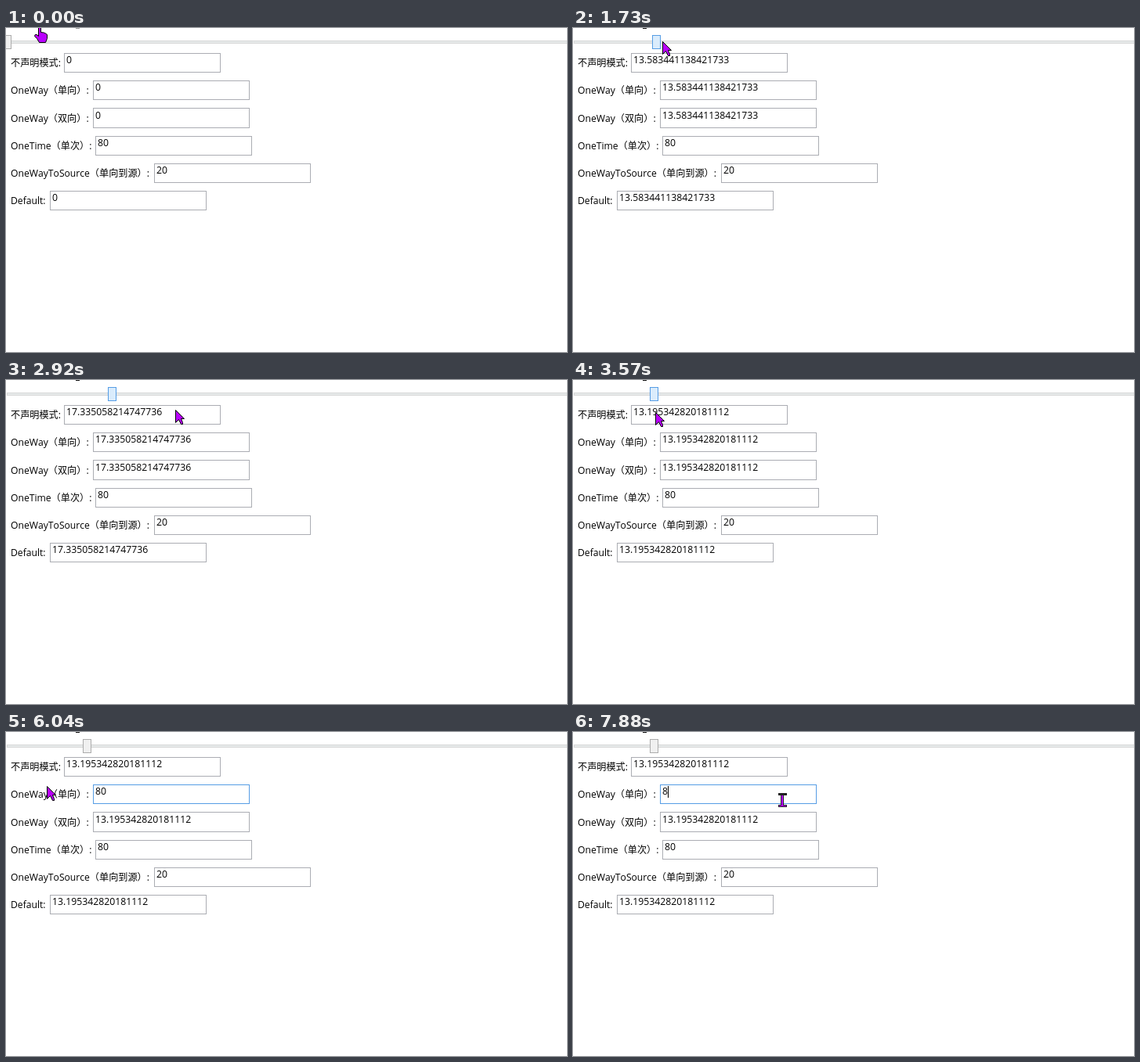
An HTML page with a canvas for the animation above (8 s loop, 716x414 px).

```html
<!DOCTYPE html>
<html lang="zh">
<head>
<meta charset="utf-8">
<style>
  html, body { margin: 0; width: 100%; height: 100%; overflow: hidden; background: #fff; }
  canvas { display: block; }
</style>
</head>
<body>
<canvas id="stage" width="716" height="414"></canvas>
<script>
const ctx = document.getElementById('stage').getContext('2d');
const LOOP = 8000, STEP = 91.8;
const FONT = '"Open Sans", "Noto Sans CJK SC", "Noto Sans CJK", sans-serif';
const PURPLE = '#b900ff', HOVER = '#7eb4ea', ACTIVE = '#569de5';
const DRAG_START = 12, DRAG_END = 39;

const ROW_PITCH = 35.2;
const rows = [
  ['不声明模式:', 74],
  ['OneWay（单向）:', 111],
  ['OneWay（双向）:', 111],
  ['OneTime（单次）:', 114],
  ['OneWayToSource（单向到源）:', 189],
  ['Default:', 56]
].map(([label, x], i) => {
  const top = 32 + ROW_PITCH * i;
  const y = Math.round(top);
  return {
    label, x, y,
    h: Math.round(top + 25.2) - y,
    textY: Math.round(top + 13.2),
    labelY: Math.round(top + 17.2)
  };
});

// pointer stops: step, x, y
const stops = [
  [0, 41, -2], [4, 52, 9], [9, 5, 16], [11, 5, 16], [18, 114, 17], [19, 114, 17],
  [30, 127, 28], [31, 143, 32], [32, 216, 38], [35, 345, 40], [38, 111, 41], [39, 105, 41],
  [46, 245, 80], [47, 245, 80], [51, 52, 69], [66, 52, 69],
  [72, 271, 45], [73, 271, 45], [78, 267, 87], [99, 267, 87]
];

function pointerAt(step) {
  const i = stops.findIndex(s => s[0] > step);
  const [from, x0, y0] = stops[i - 1], [to, x1, y1] = stops[i];
  const f = (step - from) / (to - from);
  return [Math.round(x0 + (x1 - x0) * f), Math.round(y0 + (y1 - y0) * f)];
}

// the thumb trails the pointer by one step and stays where it is released
function thumbAt(step) {
  if (step < DRAG_START) return 0;
  return Math.max(0, pointerAt(Math.min(step, DRAG_END) - 1)[0] - 9);
}

const within = (step, from, to) => step >= from && step < to;

function rect(x, y, w, h, fill) {
  ctx.fillStyle = fill;
  ctx.fillRect(x, y, w, h);
}

function frame(x, y, w, h, fill, border) {
  rect(x, y, w, h, border);
  rect(x + 1, y + 1, w - 2, h - 2, fill);
}

function text(str, x, y, size) {
  ctx.font = size + 'px ' + FONT;
  ctx.fillStyle = '#000';
  ctx.fillText(str, x, y);
}

function cursorShape(path, x, y) {
  const shape = new Path2D(path);
  ctx.save();
  ctx.translate(x + 0.5, y + 0.5);
  ctx.fillStyle = PURPLE;
  ctx.fill(shape);
  ctx.strokeStyle = '#000';
  ctx.stroke(shape);
  ctx.restore();
}

const cursors = {
  arrow: (x, y) => cursorShape('M0 0V16L4 12L7 18H9V16L7 11H11Z', x, y),
  hand: (x, y) => cursorShape(
    'M0 1Q2 -1 3 1V7L7 7.5L9 8.5L11 10V15L9 20H1L-2 15L-5 12Q-5 9 -2 10L0 12Z', x, y),
  beam(x, y) {
    rect(x - 5, y - 9, 11, 3, '#222');
    rect(x - 5, y + 6, 11, 3, '#222');
    rect(x - 2, y - 7, 4, 14, '#222');
    rect(x - 1, y - 6, 2, 13, PURPLE);
    rect(x - 4, y + 7, 9, 1, PURPLE);
  }
};

function slider(px, dragging, hover) {
  frame(1, 16, 720, 4, '#e7eaea', '#d6d6d6');
  const [fill, border] = dragging ? ['#daecfc', ACTIVE]
    : hover ? ['#dcecfc', HOVER] : ['#f0f0f0', '#acacac'];
  frame(px - 4, 9, 11, 18, fill, border);
}

function draw(step) {
  const px = thumbAt(step);
  const [x, y] = pointerAt(step);
  const dragging = within(step, DRAG_START, DRAG_END + 1);
  const selecting = within(step, 48, 58);
  const typing = within(step, 58, 66);
  const focused = step < 48 ? -1 : within(step, 74, 80) ? 0 : 1;
  const hovered = dragging ? -1
    : rows.findIndex(r => x >= r.x && x < r.x + 200 && y >= r.y && y < r.y + r.h);

  rect(0, 0, 716, 414, '#fff');
  // lower edge of the heading cut off by the stage
  rect(89, 0, 5, 1, step < 10 ? '#999' : '#111');
  slider(px, dragging, within(step, 8, DRAG_START));

  const value = px ? (px * 100 / 773).toPrecision(17) : '0';
  const typed = within(step, 58, 60) || step >= 86 ? '8' : '80';
  const values = [value, step < 58 ? value : typed, value, '80', '20', value];

  ctx.fontKerning = 'none';
  rows.forEach((row, i) => {
    const border = i === focused ? ACTIVE : i === hovered ? HOVER : '#abadb3';
    text(row.label, 6, row.labelY, 12.15);
    frame(row.x, row.y, 200, row.h, '#fff', border);
    text(values[i], row.x + 3, row.textY, 12.25);
  });

  if (selecting) {
    const left = Math.max(114, Math.min(237, x));
    rect(left, 69, 237 - left, 15, 'rgba(0,120,215,.4)');
  }
  if (typing || step >= 80) rect(114 + 7 * typed.length, 69, 1, 15, '#000');

  // the pointer hides while keys are pressed
  if (typing) return;
  const kind = step < 2 ? 'hand' : selecting || hovered >= 0 ? 'beam' : 'arrow';
  cursors[kind](x, y);
}

function tick() {
  draw(Math.floor(performance.now() % LOOP / STEP + 0.4));
  requestAnimationFrame(tick);
}
tick();
</script>
</body>
</html>
```
